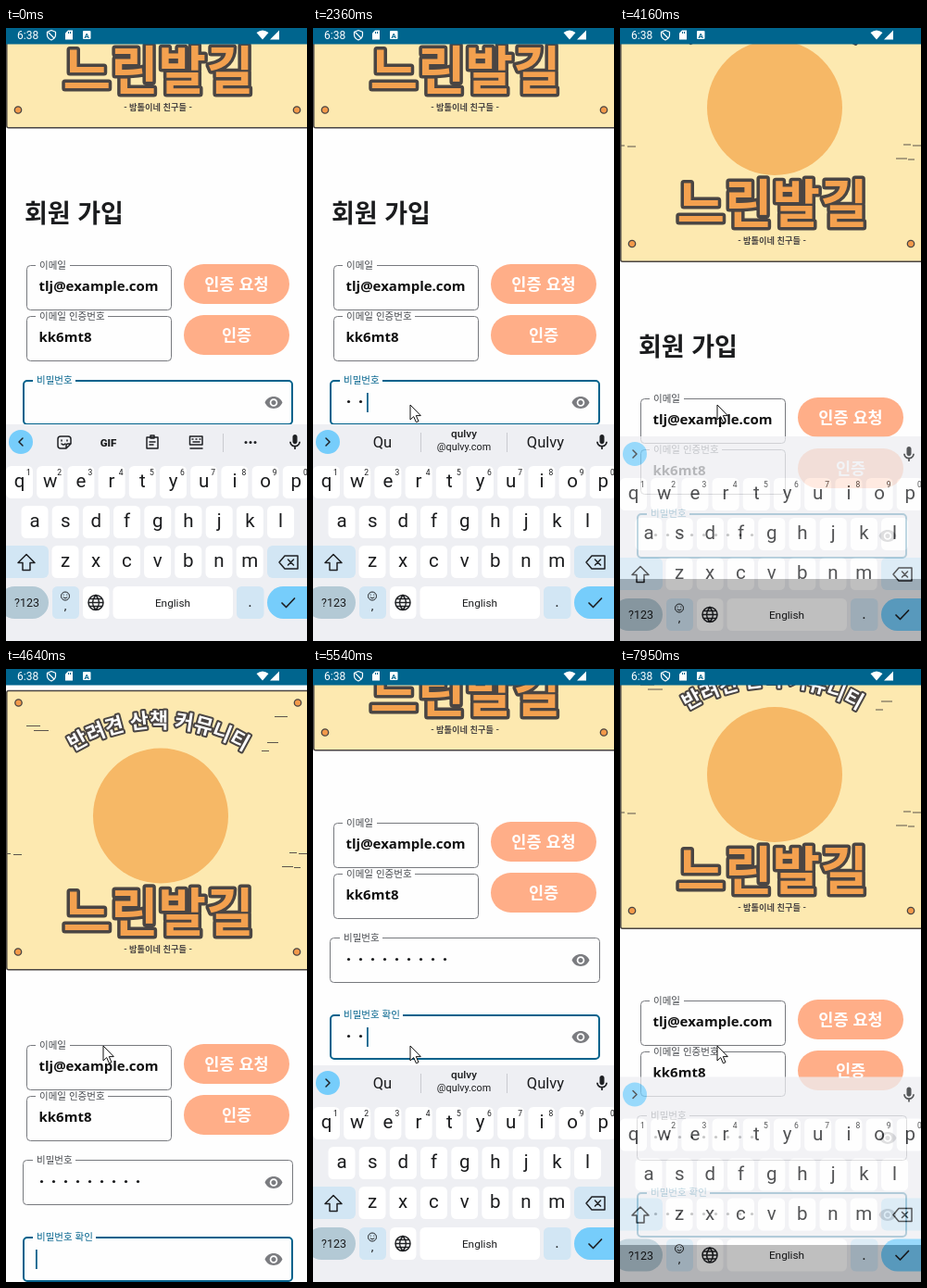
Write an HTML page that moves like this. It is 325 px wide and 662 px high and loops after 8000 ms.

```html
<!DOCTYPE html>
<html lang="ko">
<head>
<meta charset="utf-8">
<title>회원 가입</title>
<style>
  html, body { margin: 0; width: 100%; height: 100%; overflow: hidden; background: #000; }
  svg { display: block; width: 325px; height: 662px; }
  text { font-family: "Noto Sans CJK KR", "Noto Sans CJK", sans-serif; fill: #1b1c1e; }
  .mid { text-anchor: middle; }
  .ui { font-family: Roboto, sans-serif; }
  .value { font: bold 15px "Noto Sans", sans-serif; fill: #111; }
  .label { font-size: 10.5px; fill: #45484d; }
  .box { fill: none; stroke: #77797e; stroke-width: 1; }
  .focus .box { stroke: #00628c; stroke-width: 2; x: 19px; y: 1px; width: 290px; height: 47px; }
  .focus .label { fill: #00628c; }
  .line { fill: none; stroke: #1f2124; stroke-width: 1.5; stroke-linejoin: round; stroke-linecap: round; }
  .board { stroke: #4a4543; stroke-linejoin: round; paint-order: stroke; }
</style>
</head>
<body>
<svg id="stage" viewBox="0 0 325 662"></svg>
<script>
const EYE = "M12 4.5C7 4.5 2.73 7.61 1 12c1.73 4.39 6 7.5 11 7.5s9.27-3.11 11-7.5c-1.73-4.39-6-7.5-11-7.5zM12 17c-2.76 0-5-2.24-5-5s2.24-5 5-5 5 2.24 5 5-2.24 5-5 5zm0-8c-1.66 0-3 1.34-3 3s1.34 3 3 3 3-1.34 3-3-1.34-3-3-3z";
const MIC = "M12 14c1.66 0 3-1.34 3-3V5c0-1.66-1.34-3-3-3S9 3.34 9 5v6c0 1.66 1.34 3 3 3zm5-3c0 2.76-2.24 5-5 5s-5-2.24-5-5H5c0 3.53 2.61 6.43 6 6.92V21h2v-3.08c3.39-.49 6-3.39 6-6.92h-2z";

const rect = (x, y, w, h, r, fill, more = "") =>
  `<rect x="${x}" y="${y}" width="${w}" height="${h}" rx="${r}" fill="${fill}" ${more}/>`;
const dot = (x, y, r, fill, more = "") => `<circle cx="${x}" cy="${y}" r="${r}" fill="${fill}" ${more}/>`;
const line = (d, more = "") => `<path class="line" d="${d}" ${more}/>`;
const text = (x, y, size, str, cls = "ui mid", more = "") =>
  `<text x="${x}" y="${y}" font-size="${size}" class="${cls}" ${more}>${str}</text>`;
const icon = (d, x, y, k, fill) =>
  `<path d="${d}" fill="${fill}" transform="translate(${x} ${y}) scale(${k}) translate(-12 -12)"/>`;

// ---- poster, origin at the level of its lower pins ----
function poster() {
  const pins = [[13.5, -269], [315, -269], [13, 0], [314, 0]]
    .map(([x, y]) => dot(x, y, 3.7, "#f2994a", 'stroke="#4a4543" stroke-width="1.3"')).join("");
  const grain = "M22 -244h15M30 -239h16M282 -226h12M276 -217h8M290 -254h14" +
    "M0 -106h5M8 -105h9M306 -107h8M316 -106h9M298 -92h12M311 -91h7";
  return rect(.8, -282, 328, 301.3, 2, "#fde9b0", 'stroke="#4a4543" stroke-width="1.5"') +
    `<path d="${grain}" stroke="#5b544c" stroke-width="1.2"/>` + pins +
    dot(167, -147, 73, "#f6b866") +
    `<path id="arc" d="M66 -212A175 175 0 0 1 264 -212" fill="none"/>
     <text class="board mid" font-size="22" font-weight="900" stroke-width="4" style="fill:#fff">
     <textPath href="#arc" startOffset="50%">반려견 산책 커뮤니티</textPath></text>` +
    text(164.5, -23, 56, "느린발길", "board mid", 'font-weight="900" stroke-width="7" style="fill:#f4a14f"') +
    text(164, 0, 9.2, "- 밤톨이네 친구들 -", "mid", 'font-weight="700" style="fill:#4a4543"');
}

// ---- form, origin at the top edge of the first field ----
function field(id, x, y, w, labelX, gap, label, inner) {
  return `<g id="${id}" transform="translate(0 ${y})">
    <rect class="box" x="${x}" y=".5" width="${w}" height="48" rx="4"/>` +
    rect(labelX - 4, -2, gap, 5, 0, "#fefefe") + text(labelX, 4, 10.5, label, "label") + inner + "</g>";
}
function secret(id, y, gap, label) {
  let marks = "";
  for (let i = 0; i < 9; i++) marks += dot(38.5 + 13 * i, 23.5, 1.6, "#1b1c1e", 'class="mark"');
  return field(id, 18.5, y, 291, 33, gap, label, icon(EYE, 289, 24.5, .86, "#7b7c80") + marks +
    '<path class="under" stroke="#1b1c1e" stroke-width="1"/>' +
    rect(0, 14, 1.8, 21, 0, "#00628c", 'class="caret"'));
}
const pill = (y, str) => rect(192, y, 114, 43, 21.5, "#ffae88") +
  text(249, y + 28, 17.5, str, "mid", 'font-weight="700" style="fill:#fff"');

function form() {
  return field("mail", 22.5, 0, 156, 36, 37, "이메일", '<text class="value" x="35.5" y="28">tlj@example.com</text>') +
    field("code", 22.5, 55, 156, 36, 78, "이메일 인증번호", '<text class="value" x="35.5" y="28">kk6mt8</text>') +
    pill(-1, "인증 요청") + pill(54, "인증") +
    secret("pass", 124, 46, "비밀번호") + secret("again", 207, 68, "비밀번호 확인");
}

// ---- keyboard ----
const BLUE = "#d2e6f4";
function letters(chars, first, y, digits) {
  return [...chars].map((c, i) => {
    const x = first + 33.2 * i;
    return rect(x - 14.5, y, 29, 35, 5.5, "#fff") + text(x, y + 23, 20.5, c) +
      (digits ? text(x + 10, y + 10, 8.5, (i + 1) % 10) : "");
  }).join("");
}
function tools() {
  return line("M59 441h8a3 3 0 0 1 3 3v5l-5 5h-6a3 3 0 0 1-3-3v-7a3 3 0 0 1 3-3zM70 449h-3a2 2 0 0 0-2 2v3M60 445v1M66 445v1M60 449q2 2 4 0") +
    text(110.5, 451.5, 11.5, "GIF", "ui mid", 'font-weight="900"') +
    line("M152 442h12v12h-12zM156 440h4v3h-4zM155 447h6M155 450h4") +
    line("M198.500 441h13.500v9h-13.500zM201 444h1M205 444h1M209 444h1M202 447h7M199 454h13") +
    rect(234, 438, 1, 20, 0, "#c9cbd0") +
    [259, 264, 269].map(x => dot(x, 447.5, 1.5, "#1f2124")).join("");
}
const pair = (x, tail) => text(x, 441.5, 11.8, "qulvy", "ui mid", 'font-weight="500"') +
  text(x, 456, 10.8, "@qulvy" + tail);
const bars = rect(116, 437, 1, 21, 0, "#c9cbd0") + rect(209, 437, 1, 21, 0, "#c9cbd0");
const hints = {
  tools: tools(),
  empty: "",
  word: bars + text(75, 453, 16.5, "Qulvy") + pair(163, ".com") + pair(251, ".co")
};
const early = n => bars + text(75, 453, 16.5, "Qulvy".slice(0, n)) + pair(163, ".com") + text(251, 453, 16.5, "Qulvy");

function keyboard() {
  return rect(0, 428, 325, 240, 0, "#eeeff3") +
    dot(16, 447, 13, "#76cdfb") + line("M18 443l-4 4 4 4", 'id="chev" stroke-width="1.8"') +
    '<g id="strip"></g>' + icon(MIC, 312, 447.5, .84, "#1f2124") +
    letters("qwertyuiop", 14.5, 473, true) + letters("asdfghjkl", 31, 516) + letters("zxcvbnm", 64, 559) +
    rect(-6, 559, 52, 35, 6, BLUE) + line("M22 568.500l9 9h-5v8h-8v-8h-5z") +
    rect(282, 559, 52, 35, 6, BLUE) + line("M301 570h14v14h-14l-6-7zM304.500 574l6 6M310.500 574l-6 6") +
    rect(-8, 603, 54, 35, 17.5, "#b3c9d5") + text(22.5, 625, 12.5, "?123") +
    rect(50, 603, 29, 35, 5.5, BLUE) + dot(64, 613.500, 4.5, "none", 'stroke="#1f2124"') +
    line("M62.200 612v.2M65.800 612v.2M62 615q2 2 4 0", 'style="stroke-width:1"') + text(64, 628, 13, ",") +
    rect(83, 603, 28.500, 35, 5.5, "#fff") +
    line("M89 620.500a8 8 0 0 1 16 0a8 8 0 0 1-16 0h16M97 612.500q-7 8 0 16q7-8 0-16M90.500 616.500h13M90.500 624.500h13") +
    rect(115.500, 603, 129.500, 35, 5.5, "#fff") + text(180, 624.5, 11.8, "English") +
    rect(249, 603, 29.500, 35, 5.5, BLUE) + text(263.5, 625, 17, ".") +
    rect(282, 603, 60, 35, 17.5, "#76cdfb") + line("M298 621l4.500 4.500 9-9.500", 'style="stroke-width:1.7"');
}

function status() {
  const w = 'style="stroke:#fff;stroke-width:1.2"';
  return rect(0, 0, 325, 17.5, 0, "#00658e") + text(12, 12, 12, "6:38", "ui", 'style="fill:#fff"') +
    line("M49 2.500l4.500 1.700v3.300q0 3.500-4.500 5.500q-4.500-2-4.500-5.500v-3.300zM46 5l6 6", w) +
    '<path d="M67 2.500h5v10h-8v-7z" fill="#fff"/><path d="M67.500 4v2M69.500 4v2" stroke="#00658e"/>' +
    rect(83, 3, 8.5, 9, 1, "#fff") + text(87.2, 10.5, 8, "A", "ui mid", 'font-weight="700" style="fill:#00658e"') +
    '<path d="M270.500 5q6.500-5 13 0l-6.500 7.500zM285 12.500h10v-10z" fill="#fff"/>';
}

const stage = document.getElementById("stage");
stage.innerHTML = `
  <defs><clipPath id="page"><rect id="view" y="17" width="325" height="645"/></clipPath></defs>
  <rect width="325" height="662"/>
  <g clip-path="url(#page)">
    <rect width="325" height="662" fill="#fefefe"/>
    <g id="poster">${poster()}</g>
    <g id="head">${text(20, 0, 27, "회원 가입", "", 'font-weight="700"')}</g>
    <g id="form">${form()}</g>
  </g>
  <g id="keys">${keyboard()}</g>
  ${status()}
  <path id="mouse" d="M0 0v16l3.700-3.400 2.700 6.200 2.600-1.100-2.700-6.100h5z" fill="#fff" stroke="#111" stroke-width="1"/>`;

// ---- timeline ----
// time, form top, poster gap, page bottom, keyboard drop, keyboard opacity
const layout = [
  [0, 256, 167.5, 428, 0, 1],
  [4160, 400, 167, 595, 13, .75],
  [4230, 406, 167.5, 662, 17, .35],
  [4300, 406, 167.5, 662, 18, .1],
  [4370, 406, 167.5, 662, 18, 0],
  [4570, 406, 100.5, 662, 18, 0],
  [4710, 270, 98, 510, 80, 1],
  [4780, 168, 97.5, 432, 18, 1],
  [4850, 166, 97.5, 428, 0, 1],
  [7880, 190, 97.5, 470, 4, .95],
  [7950, 358, 97, 622, 12.5, .75]
];
const typed = {
  pass: [2080, 2290, 2560, 3160, 3290, 3430, 3560, 3760, 3960],
  again: [5120, 5400, 5740, 6080, 6480, 6950, 7020, 7150, 7220]
};
const REFOCUS = 4570;
const caretTurns = [140, 760, 1250, 1750, 2080, 4160, REFOCUS, 7880];
const moves = [[70, 255, 608], [560, 109, 420], [760, 109, 420], [1350, 105, 407]];

const $ = id => document.getElementById(id);
const shift = (id, x, y) => $(id).setAttribute("transform", `translate(${x} ${y})`);
const count = (times, t) => times.filter(v => v <= t).length;

function mouseAt(t) {
  let i = 0;
  while (i < moves.length - 1 && moves[i + 1][0] <= t) i++;
  const a = moves[i], b = moves[i + 1];
  if (!b) return a.slice(1);
  const k = Math.floor((t - a[0]) / 70) * 70 / (b[0] - a[0]);
  const e = 1 - (1 - k) * (1 - k);
  return [a[1] + (b[1] - a[1]) * e, a[2] + (b[2] - a[2]) * e];
}

function hintAt(t) {
  const again = t >= REFOCUS;
  const n = count(again ? typed.again : typed.pass, t);
  if (!n) return hints.tools;
  if (n > 5) return hints.empty;
  return n > 3 || (!again && t >= 2830) ? hints.word : early(n);
}

function drawSecret(id, t, focus) {
  const g = $(id), n = count(typed[id], t);
  g.setAttribute("class", focus ? "focus" : "");
  g.querySelectorAll(".mark").forEach((m, i) => m.setAttribute("opacity", i < n ? 1 : 0));
  const caret = g.querySelector(".caret");
  const lit = count(caretTurns, t) % 2 === 1;
  caret.setAttribute("x", 32 + 13 * n);
  caret.setAttribute("opacity", focus && lit ? 1 : 0);
  const word = focus && n > 2 && n < 6;
  g.querySelector(".under").setAttribute("d", word ? `M32 31.500h${13 * n}` : "");
}

let shown = null;
function draw(t) {
  const [, top, gap, bottom, drop, alpha] = layout.filter(r => r[0] <= t).pop();
  shift("form", 0, top);
  shift("poster", 0, top - gap);
  shift("head", 0, top - 46);
  $("head").setAttribute("opacity", t < REFOCUS ? 1 : 0);
  $("view").setAttribute("height", bottom - 17);
  shift("keys", 0, drop);
  $("keys").setAttribute("opacity", alpha);
  drawSecret("pass", t, t < REFOCUS);
  drawSecret("again", t, t >= REFOCUS);
  const hint = hintAt(t);
  if (hint !== shown) {
    $("strip").innerHTML = shown = hint;
    $("chev").setAttribute("transform", hint === hints.tools ? "" : "rotate(180 16 447)");
  }
  $("mouse").setAttribute("opacity", t < 70 ? 0 : 1);
  if (t >= 70) shift("mouse", ...mouseAt(t));
}

const start = performance.now();
function tick() {
  draw((performance.now() - start) % 8000);
  requestAnimationFrame(tick);
}
draw(0);
requestAnimationFrame(tick);
</script>
</body>
</html>
```
